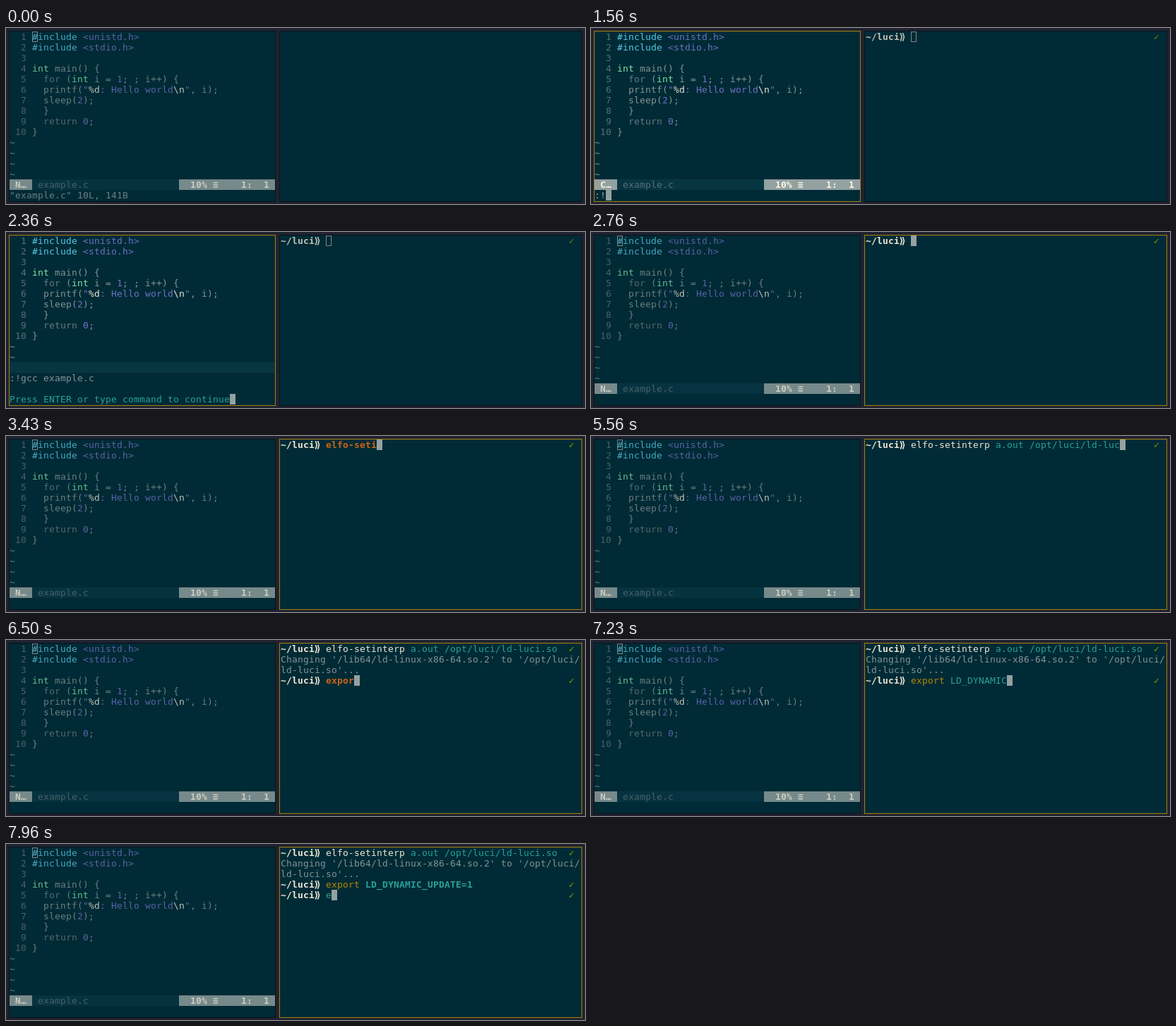
An HTML page with a canvas that plays this animation: 820x250 px, repeating every 8 s.

```html
<!DOCTYPE html>
<html lang="en">
<head>
<meta charset="utf-8">
<style>
  html, body { margin: 0; height: 100%; overflow: hidden; background: #20222f; }
  canvas { display: block; }
</style>
</head>
<body>
<canvas id="stage" width="820" height="250"></canvas>
<script>
const ctx = document.getElementById('stage').getContext('2d');
const LOOP = 8000, TICK = 66.67, CELL_W = 8, CELL_H = 15, TOP = 5;
const LEFT = 5, RIGHT = 389;
const C = {
  desk: '#20222f', bg: '#002b36', edge: '#08141d', gold: '#a9810c',
  text: '#839496', faint: '#586e75', keyword: '#657b83', light: '#eee8d5',
  block: '#93a1a1', bar: '#073642', cyan: '#56c8e8', green: '#7fe3ab',
  violet: '#6c71c4', teal: '#2aa198', yellow: '#b58900', orange: '#cb6516', ok: '#859900'
};

// Source lines as [colour, text] runs.
const code = [
  [['cyan', '#include '], ['violet', '<unistd.h>']],
  [['cyan', '#include '], ['violet', '<stdio.h>']],
  [],
  [['green', 'int'], ['text', ' main() {']],
  [['keyword', '  for '], ['text', '('], ['green', 'int'], ['text', ' i = '],
   ['violet', '1'], ['text', '; ; i++) {']],
  [['text', '  printf('], ['violet', '"'], ['light', '%d'], ['violet', ': Hello world'],
   ['light', '\\n'], ['violet', '"'], ['text', ', i);']],
  [['text', '  sleep('], ['violet', '2'], ['text', ');']],
  [['text', '  }']],
  [['keyword', '  return '], ['violet', '0'], ['text', ';']],
  [['text', '}']]
];

// Typing progress as [time, characters] points.
const vimCommand = ':!gcc %';
const vimKeys = [[1360, 1], [1500, 2], [1700, 3], [1960, 7]];
const commands = [
  { row: 0, shown: 0, text: 'elfo-setinterp a.out /opt/luci/ld-luci.so', done: 5960,
    keys: [[2900, 1], [3700, 14], [3760, 15], [4160, 18], [4230, 20], [4430, 21],
           [5230, 32], [5300, 33], [5560, 37], [5830, 41]] },
  { row: 3, shown: 6030, text: 'export LD_DYNAMIC_UPDATE=1', done: 7890,
    keys: [[6160, 1], [6500, 5], [6960, 13], [7030, 14], [7560, 24], [7700, 25], [7760, 26]] },
  { row: 4, shown: 7890, text: 'e', done: Infinity, keys: [[7960, 1]] }
];

function typedCount(keys, t) {
  const next = keys.findIndex(([time]) => time > t);
  if (next === 0) return 0;
  if (next < 0) return keys[keys.length - 1][1];
  const [t0, n0] = keys[next - 1], [t1, n1] = keys[next];
  return Math.floor(n0 + (n1 - n0) * (t - t0) / (t1 - t0));
}

function rect(x, y, w, h, color) {
  ctx.fillStyle = color;
  ctx.fillRect(x, y, w, h);
}

function frame(x, y, w, h, color) {
  ctx.strokeStyle = color;
  ctx.lineWidth = 1;
  ctx.strokeRect(x + 0.5, y + 0.5, w - 1, h - 1);
}

// Writes on the cell grid and returns the column after the text.
function write(left, col, row, text, color, bold) {
  ctx.font = (bold ? 'bold ' : '') + '13px "DejaVu Sans Mono", monospace';
  ctx.fillStyle = C[color] || color;
  for (const ch of text) {
    if (ch !== ' ') ctx.fillText(ch, left + col * CELL_W, TOP + row * CELL_H + 12);
    col++;
  }
  return col;
}

function cursor(left, col, row, focused, under = ' ') {
  const x = left + col * CELL_W, y = TOP + row * CELL_H;
  if (!focused) return frame(x, y, CELL_W, CELL_H, C.block);
  rect(x, y, CELL_W, CELL_H, C.block);
  write(left, col, row, under, 'bg');
}

function pane(x, w, focused, glow, drawContent) {
  rect(x, 4, w, 243, C.bg);
  drawContent();
  ctx.globalAlpha = 0.2 * (1 - glow);
  rect(x, 4, w, 243, C.bg);
  ctx.globalAlpha = 1;
  frame(x, 4, w, 243, focused ? C.gold : C.edge);
}

function drawEditor(t, focused) {
  code.forEach((runs, row) => {
    write(LEFT, 0, row, String(row + 1).padStart(3), 'faint');
    let col = 4;
    for (const [color, text] of runs) col = write(LEFT, col, row, text, color);
  });
  for (let row = 10; row < 14; row++) write(LEFT, 0, row, '~', 'text');

  const commandMode = t >= 1360 && t < 2430;
  if (commandMode && t >= 2100) {
    rect(LEFT, 185, 376, 60, C.bg);
    rect(LEFT, 185, 376, CELL_H, C.bar);
    write(LEFT, 0, 13, ':!gcc example.c', 'text');
    const end = write(LEFT, 0, 15, 'Press ENTER or type command to continue', 'teal');
    cursor(LEFT, end, 15, focused);
    return;
  }

  rect(LEFT, 215, 376, CELL_H, C.bar);
  rect(LEFT, 215, 32, CELL_H, C.block);
  rect(245, 215, 136, CELL_H, C.block);
  write(LEFT, 1, 14, commandMode ? 'C…' : 'N…', '#fdf6e3', true);
  write(LEFT, 5, 14, 'example.c', 'faint');
  write(LEFT, 32, 14, '10% ≡    1:  1', '#fdf6e3', true);

  if (commandMode) {
    const line = vimCommand.slice(0, typedCount(vimKeys, t));
    cursor(LEFT, write(LEFT, 0, 15, line, 'block'), 15, focused);
  } else {
    if (t < 1360) write(LEFT, 0, 15, '"example.c" 10L, 141B', 'text');
    cursor(LEFT, 4, 0, focused, '#');
  }
}

function commandStyle(word) {
  if (word === 'e') return ['teal', false];
  if (word === 'ex' || word === 'elfo-setinterp') return ['light', false];
  if (word === 'export') return ['yellow', false];
  return ['orange', true];
}

function drawShell(t, focused) {
  for (const { row, shown, text, done, keys } of commands) {
    if (t < shown) continue;
    write(RIGHT, 0, row, '~/luci⟫', 'light', true);
    write(RIGHT, 51, row, '✓', 'ok');
    const line = text.slice(0, typedCount(keys, t));
    const word = line.split(' ')[0], args = line.slice(word.length);
    let col = write(RIGHT, 8, row, word, ...commandStyle(word));
    col = write(RIGHT, col, row, args, 'teal', args.includes('='));
    if (t < done) cursor(RIGHT, col, row, focused);
  }
  if (t >= commands[0].done) {
    write(RIGHT, 0, 1, "Changing '/lib64/ld-linux-x86-64.so.2' to '/opt/luci/", 'text');
    write(RIGHT, 0, 2, "ld-luci.so'...", 'text');
    if (t < commands[1].shown) cursor(RIGHT, 0, 3, focused);
  }
}

function draw(ms) {
  const t = 500 + Math.floor((ms - 493) / TICK) * TICK;
  const fade = start => Math.max(0, Math.min(1, (Math.floor((t - start) / TICK) + 1) / 3));
  const editorGlow = fade(500) - fade(2630), shellGlow = fade(2630);
  const editorFocus = t >= 500 && t < 2630, shellFocus = t >= 2630;
  rect(0, 0, 820, 250, C.desk);
  pane(4, 378, editorFocus, editorGlow, () => drawEditor(t, editorFocus));
  pane(387, 429, shellFocus, shellGlow, () => drawShell(t, shellFocus));
}

const start = performance.now();
function loop() {
  draw((performance.now() - start) % LOOP);
  requestAnimationFrame(loop);
}
loop();
</script>
</body>
</html>
```
